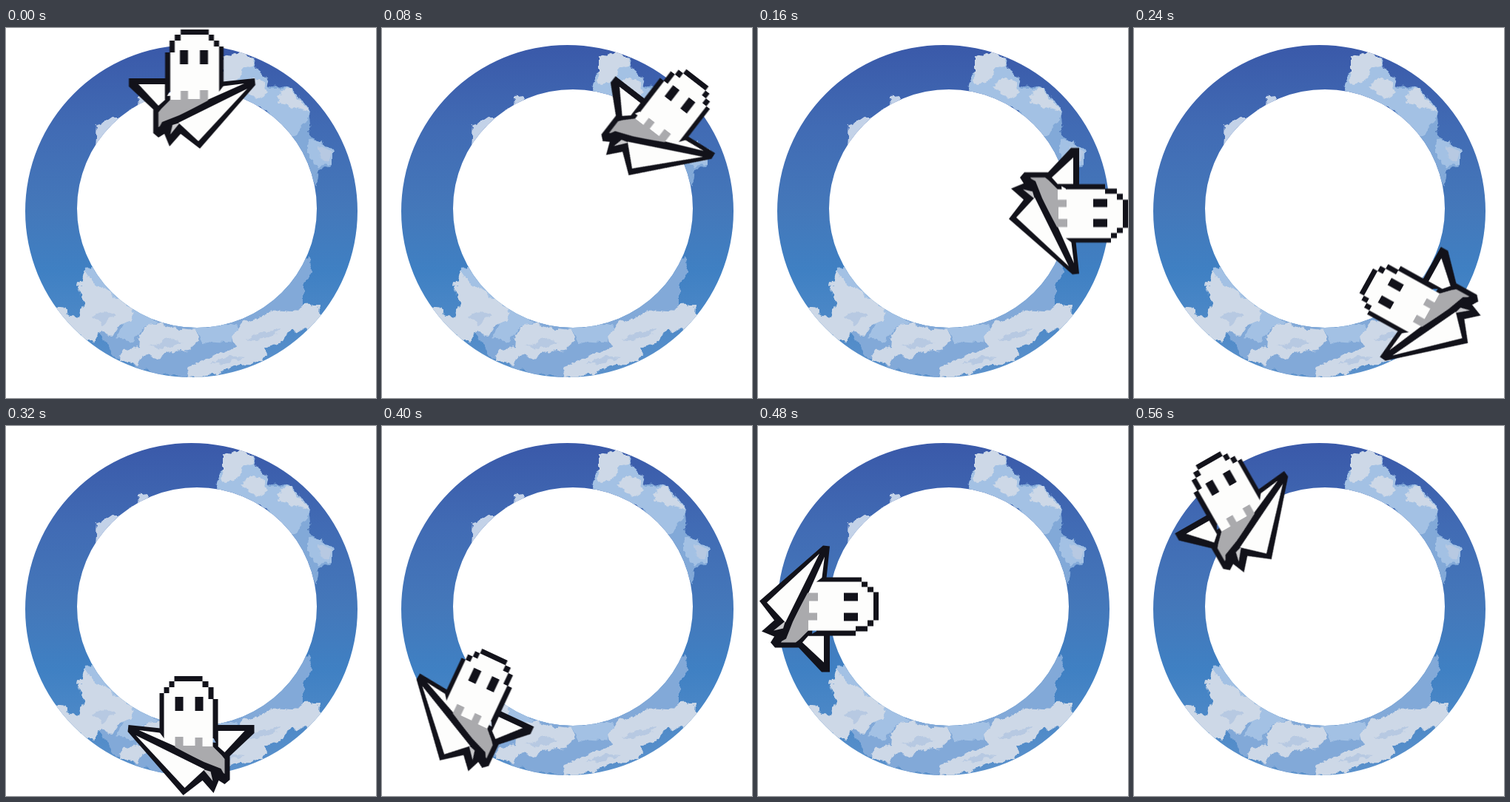
An HTML page that plays this animation: 500x500 px, repeating every 640 ms.

```html
<!DOCTYPE html>
<html lang="en">
<head>
<meta charset="utf-8">
<title>Ghost plane around a sky ring</title>
<style>
  html, body { margin: 0; width: 100%; height: 100%; overflow: hidden; background: #fff; }
  svg { display: block; width: 100vw; height: 100vh; }
  .pilot { animation: orbit 640ms step-end infinite; }
  .ink { fill: #12121a; }
  .paper { fill: #fdfdfc; }

  /* The pilot flips whenever it would hang upside down. */
  @keyframes orbit {
    0%    { transform: translate(251.5px, 70px); }
    12.5% { transform: translate(382px, 119px) rotate(37.7deg); }
    25%   { transform: translate(432px, 247.5px) rotate(90deg); }
    37.5% { transform: translate(375px, 371.5px) rotate(119deg) scaleY(-1); }
    50%   { transform: translate(250px, 406px) rotate(180deg) scaleY(-1); }
    62.5% { transform: translate(127px, 372px) rotate(205deg) scaleY(-1); }
    75%   { transform: translate(95px, 247px) rotate(270deg) scaleY(-1); }
    87.5% { transform: translate(130.5px, 104.5px) rotate(-29.7deg); }
  }
</style>
</head>
<body>
<svg viewBox="0 0 500 500">
  <defs>
    <linearGradient id="sky" x1="0" y1="23" x2="0" y2="472" gradientUnits="userSpaceOnUse">
      <stop offset="0" stop-color="#3a59a9"/>
      <stop offset=".25" stop-color="#416bb4"/>
      <stop offset=".5" stop-color="#4478ba"/>
      <stop offset=".68" stop-color="#3f80c3"/>
      <stop offset="1" stop-color="#5c92cc"/>
    </linearGradient>
    <clipPath id="ring">
      <path clip-rule="evenodd" d="M26 247.5a224.5 224.5 0 1 1 449 0a224.5 224.5 0 1 1-449 0zM96 244a162 161 0 1 0 324 0a162 161 0 1 0-324 0z"/>
    </clipPath>
    <filter id="ragged" x="0" y="0" width="500" height="500" filterUnits="userSpaceOnUse" color-interpolation-filters="sRGB">
      <feTurbulence type="fractalNoise" baseFrequency=".08" numOctaves="3" seed="8"/>
      <feDisplacementMap in="SourceGraphic" scale="12" xChannelSelector="R" yChannelSelector="G"/>
    </filter>
  </defs>

  <g clip-path="url(#ring)">
    <rect width="500" height="500" fill="url(#sky)"/>
    <g filter="url(#ragged)">
      <g fill="#82a9d8">
        <path d="M284 90L288 64L312 60L345 74L384 82L408 112L412 146L440 164L440 188L424 192L419 212L400 190L350 110z"/>
        <path d="M411 306L412 330L402 348L402 378L360 396L330 420L300 442L262 452L245 472L205 470L150 445L128 414L110 340L250 400L350 370z"/>
      </g>
      <g fill="#a3c1e4">
        <path d="M283 86L287 66L296 60L294 40L310 33L333 38L338 56L356 70L358 82L386 82L398 92L409 112L404 128L385 148L350 110L300 92z"/>
        <path d="M410 150L424 153L442 166L442 184L424 188L410 176z"/>
        <path d="M104 325L118 324L150 360L176 380L206 398L184 406L172 424L150 420L158 400L136 400L112 376z"/>
        <path d="M250 406L312 400L316 412L298 426L268 424z"/>
      </g>
      <path fill="#c3d2e8" d="M121 160L123 132L142 121L160 121L165 113L179 106L180 95L192 94L192 112L140 160z"/>
      <g fill="#cdd8e7">
        <path d="M294 60L294 40L310 33L332 38L335 50L322 53L314 66L304 76L292 74z"/>
        <path d="M318 78L332 66L350 74L354 88L338 98z"/>
        <path d="M366 88L384 82L396 94L407 112L390 108L372 104z"/>
        <path d="M62 376L80 378L87 390L99 391L104 374L98 352L104 326L120 346L148 364L174 381L170 393L152 400L144 414L122 412L116 424L90 410z"/>
        <path d="M152 450L160 436L178 432L180 414L192 402L212 399L236 407L254 409L261 424L249 435L226 437L206 446L188 443L174 454z"/>
        <path d="M244 474L248 456L268 449L288 440L311 431L306 416L320 396L346 390L362 380L386 382L402 375L425 374L424 394L408 408L384 410L374 424L350 431L354 445L330 455L306 457L286 467z"/>
      </g>
      <g fill="#b7c9e2">
        <path d="M420 162L430 160L440 170L436 182L426 178z"/>
        <path d="M114 390L132 382L148 390L132 400z"/>
        <path d="M196 430L216 420L238 426L218 433z"/>
        <path d="M322 422L346 410L372 407L352 420z"/>
        <path d="M276 452L302 444L322 446L298 453z"/>
      </g>
    </g>
  </g>

  <g class="pilot">
    <g transform="translate(-251.5 -70)">
      <!-- plane -->
      <path class="ink" d="M166 68H217V92L288 86V73L336 68L337 77L262 163L236 143L221 160L214 143L206 148L199 142V110L166 79z"/>
      <path class="paper" d="M179 76H215V97L206 105z"/>
      <path class="paper" d="M268 99L290 79L322 75z"/>
      <path class="paper" d="M326 82L233 128L260 153z"/>
      <!-- ghost -->
      <path class="ink" d="M236 2H274V9H281V17H288V25H294V78L288 86H221L215 97V33H221V17H228V9H236z"/>
      <path class="paper" d="M236 9H274V17H281V25H288V86L273 96L222 99V33H228V17H236z"/>
      <path class="ink" d="M235 30h11v19h-11zM262 30h11v19h-11z"/>
      <!-- folds -->
      <path fill="#aaaaad" d="M210 109L222 97H236V85H246V96H262V84H273V98L224 124L206 134V114z"/>
      <path fill="#c9c9cc" d="M225 131L235 128L222 144z"/>
      <path class="ink" d="M325 74L330 79L234 127L214 133L205 138L211 127L234 118z"/>
    </g>
  </g>
</svg>
</body>
</html>
```
